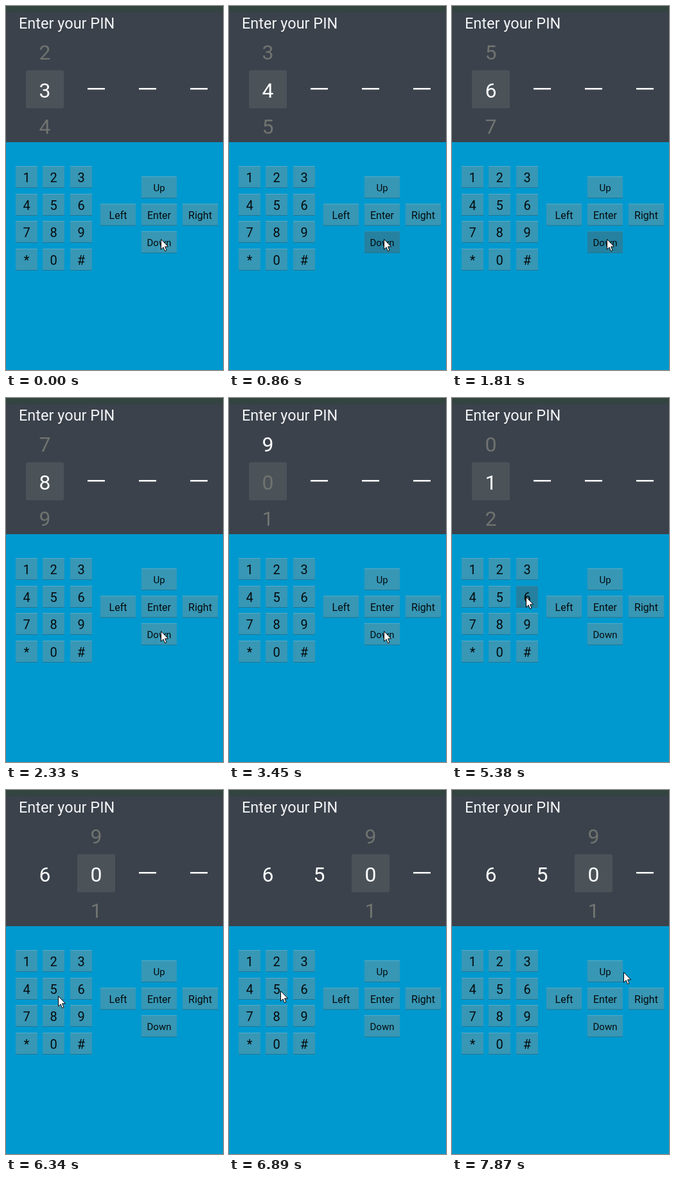
An HTML page that plays this animation: 338 px wide and 564 px high, repeating every 7990 ms.

```html
<!DOCTYPE html>
<html lang="en">
<head>
<meta charset="utf-8">
<title>PIN picker</title>
<style>
  html, body { margin: 0; width: 100%; height: 100%; overflow: hidden; background: #0099cf; }
  svg { display: block; width: 338px; height: 564px; font-family: Roboto, sans-serif; cursor: default; }
  text { text-anchor: middle; }
  .title { text-anchor: start; font-size: 23.5px; fill: #f4f5f6; }
  .digit { font-size: 32px; fill: #fff; }
  .dim { fill: #70736f; }
  .dash { fill: #fff; }
  .face { fill: #3797b5; }
  .pressed .face { fill: #25819f; }
  .shine { fill: #5aabc5; }
  .pressed .shine { fill: #338cab; }
  .edge { fill: #1f7795; }
  .key text { fill: #060b0d; }
</style>
</head>
<body>
<svg id="stage" viewBox="0 0 338 564">
  <rect width="338" height="564" fill="#0099cf"/>
  <rect width="338" height="211" fill="#3b424c"/>
  <rect width="338" height="10" fill="#334441"/>
  <text class="title" x="20" y="35">Enter your PIN</text>
  <rect id="focus" y="99.5" width="59" height="59" rx="3" fill="#4b5359"/>
  <g id="picker"></g>
  <g id="keys"></g>
  <path id="mouse" d="M.5 .5V16.2L4.1 12.8L6.5 18.7L9 17.6L6.6 11.9H11.6Z" fill="#fff" stroke="#000"/>
</svg>
<script>
const LOOP = 7990;
const $ = id => document.getElementById(id);

function add(parent, tag, attrs, label) {
  const el = document.createElementNS('http://www.w3.org/2000/svg', tag);
  for (const name in attrs) el.setAttribute(name, attrs[name]);
  if (label !== undefined) el.textContent = label;
  parent.append(el);
  return el;
}

const keys = {};
function addKey(label, x, y, w, size) {
  const g = add($('keys'), 'g', { class: 'key' });
  add(g, 'rect', { class: 'face', x, y, width: w, height: 34 });
  add(g, 'rect', { class: 'shine', x, y, width: w, height: 1 });
  add(g, 'rect', { class: 'edge', x, y: y + 33, width: w, height: 1 });
  add(g, 'text', { x: x + w / 2, y: y + 17.7 + size * 0.36, 'font-size': size }, label);
  keys[label] = g;
}

[...'123456789*0#'].forEach((label, i) =>
  addKey(label, 15 + Math.round(i % 3 * 42.4), 248 + Math.round(Math.floor(i / 3) * 42.5), 34, 20));
addKey('Up', 211, 264, 55, 15);
addKey('Left', 147, 306.5, 55, 16);
addKey('Enter', 211, 306.5, 55, 16);
addKey('Right', 275, 306.5, 55, 16);
addKey('Down', 211, 349, 55, 15);

// Four columns, each with a value, a dash and the two neighbouring digits.
const columns = [0, 1, 2, 3].map(i => {
  const x = 60.5 + i * 80;
  const digit = y => add($('picker'), 'text', { class: 'digit', x, y });
  return {
    above: digit(83), value: digit(141.5), below: digit(198),
    dash: add($('picker'), 'rect', { class: 'dash', x: x - 13.5, y: 127, width: 27, height: 2.5 })
  };
});

const down = { press: 'Down' };
const show = (value, raw = false) => ({ value, raw, press: null });
const move = (x, y) => ({ x, y });
const enter = pin => ({ pin, value: 0, press: null });

// Each step changes part of the state; "raw" means scrolled but not yet recoloured.
const steps = [
  [0, { pin: '', value: 3, raw: false, press: null, x: 241, y: 361 }],
  [310, down], [460, show(4, true)], [580, show(4)],
  [860, down], [1010, show(5)],
  [1280, down], [1410, show(6)],
  [1810, down], [1930, show(7)],
  [2200, down], [2330, show(8)],
  [2610, down], [2890, show(9)],
  [3450, show(0, true)], [3600, show(0)],
  [4000, down], [4150, show(1)],
  [4430, move(196, 354)], [4550, move(125, 338)], [4700, move(117, 316)], [4820, move(115, 308)],
  [5380, { press: '6' }], [5530, enter('6')],
  [6340, move(81, 319)], [6490, move(80, 311)],
  [6770, { press: '5' }], [6890, enter('65')],
  [7170, move(88, 326)], [7320, move(122, 352)], [7450, move(168, 358)],
  [7600, move(222, 337)], [7720, move(256, 301)], [7870, move(267, 282)]
];
let last = {};
const timeline = steps.map(([time, change]) => ({ time, state: last = { ...last, ...change } }));

function draw({ pin, value, raw, press, x, y }) {
  $('focus').setAttribute('x', 31 + pin.length * 80);
  columns.forEach((col, i) => {
    const active = i === pin.length;
    col.above.textContent = active ? (value + 9) % 10 : '';
    col.below.textContent = active ? (value + 1) % 10 : '';
    col.value.textContent = active ? value : pin[i] || '';
    col.above.classList.toggle('dim', !raw);
    col.below.classList.add('dim');
    col.value.classList.toggle('dim', active && raw);
    col.dash.style.display = i > pin.length ? '' : 'none';
  });
  for (const label in keys) keys[label].classList.toggle('pressed', label === press);
  $('mouse').setAttribute('transform', `translate(${x} ${y})`);
}

let shown;
const start = performance.now();
function tick() {
  const t = (performance.now() - start) % LOOP;
  const { state } = timeline.filter(step => step.time <= t).pop();
  if (state !== shown) draw(shown = state);
  requestAnimationFrame(tick);
}
tick();
</script>
</body>
</html>
```
